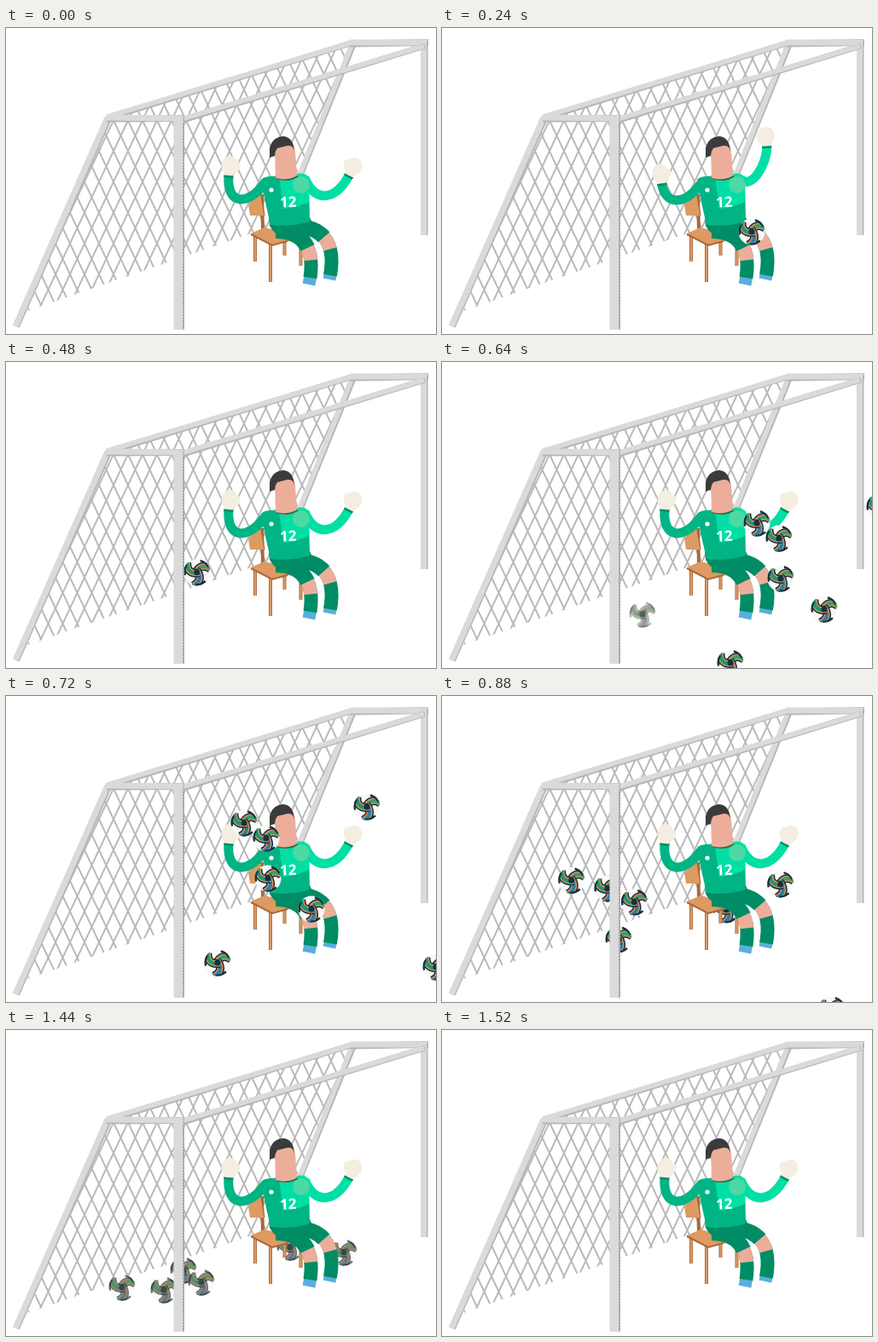
Recreate the animation shown at these times as an HTML page with a canvas. Size 504 by 359 pixels, loop 1.56 s.

```html
<!DOCTYPE html>
<html>
<head>
<meta charset="utf-8">
<style>
html, body { margin: 0; width: 100%; height: 100%; overflow: hidden; background: #fff; }
canvas { display: block; }
</style>
</head>
<body>
<canvas id="stage" width="504" height="359"></canvas>
<script>
const ctx = document.getElementById('stage').getContext('2d');
const LOOP = 1560, STEP = 40;
const SPEED = { x: -45, y: -20 }; // flight per step
const GREEN = '#00b484', BRIGHT = '#00dfa5', DARK = '#008c64';
const SKIN = '#ecae9a', GLOVE = '#f4eee0', WOOD = '#dd9a62', NAVY = '#17303f';
const lerp = (a, b, k) => a + (b - a) * k;
const clamp = v => Math.max(0, Math.min(1, v));
const ease = k => k * k * (3 - 2 * k);
const easeOut = (k, power) => 1 - (1 - k) ** power;

function fill(d, color) {
  ctx.fillStyle = color;
  ctx.fill(new Path2D(d));
}

function stroke(d, color, width, dash = []) {
  ctx.strokeStyle = color;
  ctx.lineWidth = width;
  ctx.setLineDash(dash);
  ctx.stroke(new Path2D(d));
  ctx.setLineDash([]);
}

function oval(x, y, rx, ry, color, angle = 0) {
  ctx.fillStyle = color;
  ctx.beginPath();
  ctx.ellipse(x, y, rx, ry, angle, 0, Math.PI * 2);
  ctx.fill();
}

function bar(x1, y1, x2, y2, width) {
  stroke(`M${x1 + 1} ${y1 + 1.5}L${x2 + 1} ${y2}`, '#b5b5b5', width);
  stroke(`M${x1} ${y1}L${x2} ${y2}`, '#dadada', width - 1);
}

function drawNet() {
  ctx.save();
  ctx.clip(new Path2D('M120 105L405 18L316 231L25 332Z'));
  let lines = '';
  for (let x = -180; x < 640; x += 17) lines += `M${x} 0l-169 359M${x} 0l169 359`;
  stroke(lines, '#b9b9b9', 2);
  ctx.restore();
}

function drawBackFrame() {
  bar(406, 18, 343, 175, 7);
  bar(119, 105, 11, 350, 8);
  bar(119, 104, 406, 17, 7);
}

function drawFrontFrame() {
  bar(403, 17, 494, 17, 8);
  bar(489.5, 14, 489.5, 243, 8);
  bar(202, 108, 490, 21, 7);
  bar(117, 105, 208, 106, 8);
  bar(202, 103, 202, 354, 12);
  stroke('M208 112V354', '#8f8f8f', 1.2, [2, 1.5]);
}

function drawChair() {
  const edge = '#a9683c', legs = 'M292 242V274M345.5 252V279M326.5 248V267M310 252V298';
  stroke(legs, edge, 4);
  stroke(legs, WOOD, 2.2);
  stroke('M300 195L301 238', edge, 4);
  fill('M284 207L298 191L303 220L286 220Z', WOOD);
  stroke('M298 190L303 220', edge, 1.2);
  fill('M287 241L303 234L350 246L312 255Z', WOOD);
  stroke('M287 242L312 255L330 250', edge, 2);
}

// A leg is one curve, layered from foot to shorts by length.
function drawLeg(d, shorts, knee, sock) {
  stroke(d, '#5aaedb', 15);
  stroke(d, DARK, 16, [sock, 999]);
  stroke(d, SKIN, 16, [knee, 999]);
  stroke(d, DARK, 18, [shorts, 999]);
}

function drawBody() {
  drawLeg('M325 233C365 229 390 245 379 295', 51, 67, 98);
  drawLeg('M316 238C345 238 365 255 355 301', 45, 60, 81);
  fill('M308 222L356 222L362 236L330 248Q314 243 309 232Z', DARK);
  fill('M299 178Q304 173 318 174L342 171Q352 170 355 176L356 227Q334 234 310 231L303 200Z', GREEN);
  fill('M320 175L342 171Q352 170 355 176L355 204Q340 211 325 212Z', BRIGHT);
  stroke('M317 176Q330 181 342 174', '#5d5140', 2);
  fill('M315 140L332 136Q338 137 339 145L341 173Q329 180 316 176Z', SKIN);
  fill('M309 152L309 141Q312 128 325 127Q337 128 338 145Q337 137 330 138L318 141Q315 145 315 150Z', '#3b3b3b');
}

function drawShirtMarks() {
  oval(311, 190, 2.6, 2.6, '#fff');
  oval(346, 184, 10, 10, '#4cd9a4');
  ctx.save();
  ctx.translate(331, 210);
  ctx.rotate(-0.04);
  ctx.fillStyle = '#fff';
  ctx.font = 'bold condensed 17px "Open Sans", sans-serif';
  ctx.textAlign = 'center';
  ctx.fillText('12', 0, 0);
  ctx.restore();
}

function drawArm(rest, reach, k, lift, side, color) {
  const p = rest.map((v, i) => lerp(v, reach[i], k));
  p[5] -= lift;
  p[7] -= lift;
  const [x0, y0, x1, y1, x2, y2, x, y] = p;
  stroke(`M${x0} ${y0}C${x1} ${y1} ${x2} ${y2} ${x} ${y}`, color, 11);
  ctx.save();
  ctx.translate(x, y);
  ctx.rotate(Math.atan2(y - y2, x - x2));
  stroke('M-1 -5.5V5.5', DARK, 3);
  fill('M0 -5L10 -9V9L0 5Z', GLOVE);
  oval(12, 0, 11, 9.5, GLOVE);
  oval(10, 8 * side, 7, 4, GLOVE, 0.4 * side);
  ctx.restore();
}

function drawArms(t) {
  const k = t < 340 ? ease(clamp((t - 200) / 120)) : 1 - ease(clamp((t - 360) / 120));
  drawArm([303, 182, 284, 209, 258, 208, 261, 173],
          [303, 186, 285, 206, 272, 211, 248, 209], k, 0, 1, GREEN);
  drawArm([350, 176, 363, 207, 387, 201, 402, 173],
          [350, 180, 364, 146, 366, 132, 320, 138], k, 35 * Math.sin(Math.PI * k), -1, BRIGHT);
}

function drawBall(x, y, alpha) {
  ctx.save();
  ctx.globalAlpha = alpha;
  ctx.translate(x, y);
  oval(0, 0, 15.5, 15.5, '#f7f8f8');
  ctx.beginPath();
  ctx.arc(0, 0, 15.5, 0, Math.PI * 2);
  ctx.clip();
  for (const color of ['#35a06b', '#2581a8', '#129c78']) {
    const ribbon = 'M-2 2C2 -8 9 -9 16 -4';
    stroke(ribbon, NAVY, 10);
    stroke(ribbon, '#e08a52', 7);
    stroke(ribbon, color, 4);
    stroke('M4 -14Q11 -12 14 -6', NAVY, 3);
    ctx.rotate(Math.PI * 2 / 3);
  }
  oval(0, 0, 3.5, 3.5, NAVY);
  ctx.restore();
}

// Each ball passes `pass` at time `at`, strikes after `hit` steps and settles at `rest`.
const volley = { at: 720, settle: 320, gone: 1520 };
const balls = [
  { at: 360, settle: 240, gone: 680, pass: [228, 179], hit: 1, rest: [235, 296] },
  { ...volley, pass: [279, 149], hit: 2, rest: [136, 302] },
  { ...volley, pass: [305, 167], hit: 2, rest: [185, 305] },
  { ...volley, pass: [248, 313], hit: 1, rest: [208, 282] },
  { ...volley, pass: [307, 214], hit: 2, rest: [229, 296] },
  { ...volley, pass: [423, 130], hit: 0.5, rest: [396, 261] },
  { ...volley, pass: [358, 250], hit: 0.5, rest: [333, 255] },
  { ...volley, pass: [504, 318], hit: 2, rest: [475, 440] }
];

function drawBalls(t, inFront) {
  for (const { at, settle, gone, pass, hit, rest } of balls) {
    const strike = at + hit * STEP;
    if (t >= gone || inFront !== t < strike) continue;
    const steps = Math.min(t - at, hit * STEP) / STEP;
    const k = clamp((t - strike) / (at + settle - strike));
    const x = lerp(pass[0] + SPEED.x * steps, rest[0], easeOut(k, 3));
    const y = lerp(pass[1] + SPEED.y * steps, rest[1], easeOut(k, 2));
    drawBall(x, y, clamp((gone - t) / 120));
  }
}

function render(now) {
  const t = Math.floor((now % LOOP) / STEP) * STEP;
  ctx.fillStyle = '#fff';
  ctx.fillRect(0, 0, 504, 359);
  drawNet();
  drawBackFrame();
  drawBalls(t, false);
  drawChair();
  drawBody();
  drawArms(t);
  drawShirtMarks();
  drawFrontFrame();
  drawBalls(t, true);
}

const start = performance.now();
function tick() {
  render(performance.now() - start);
  requestAnimationFrame(tick);
}
tick();
</script>
</body>
</html>
```
